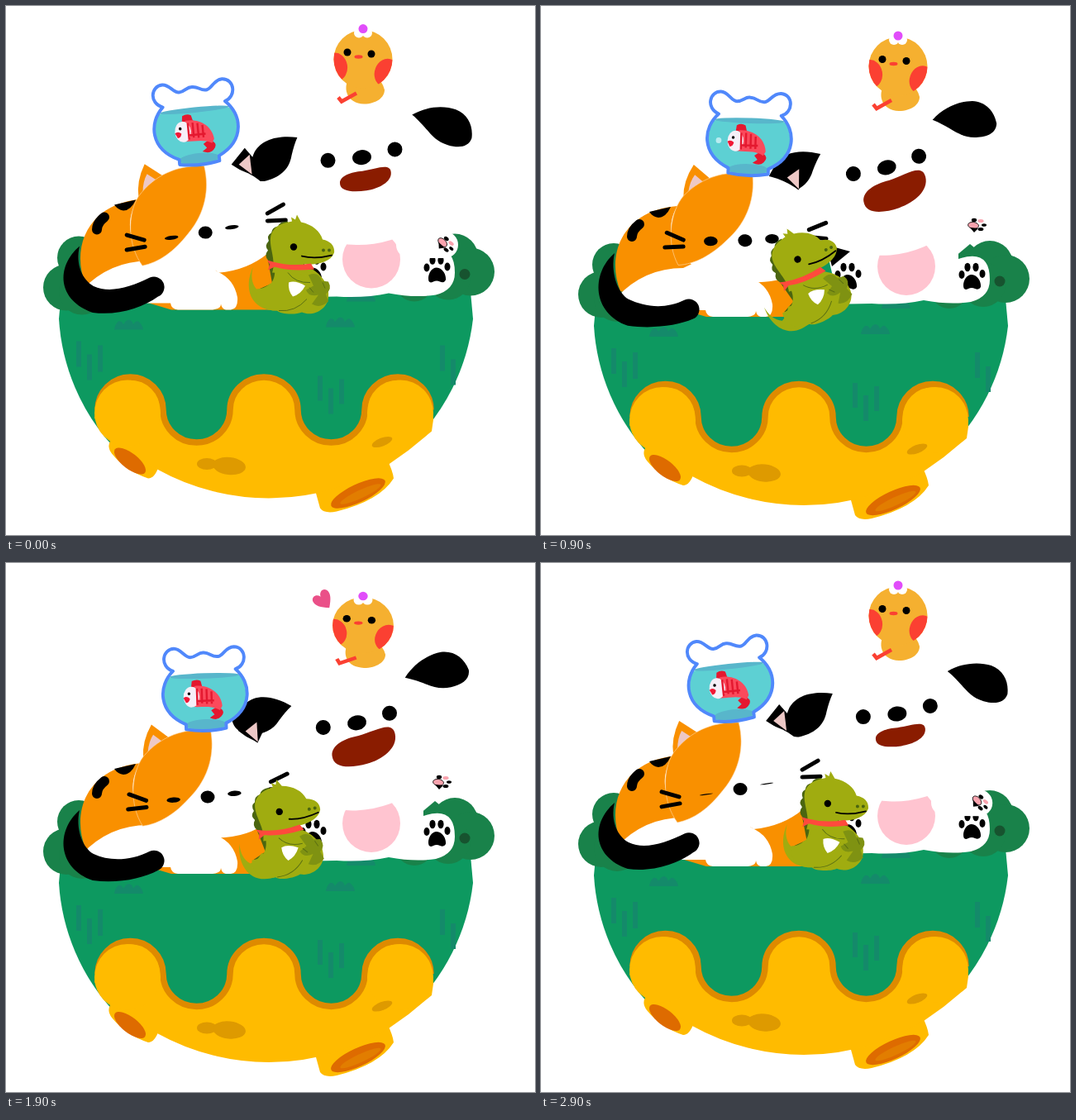
Animation of 640 by 640 pixels, one loop 3 s. Source, as an HTML page:

```html
<!DOCTYPE html>
<html lang="en">
<head>
<meta charset="utf-8">
<title>Animal friends</title>
<style>
html, body { margin: 0; width: 100%; height: 100%; overflow: hidden; background: #fff; }
svg { display: block; width: 100%; height: 100%; }
.bush { fill: #19824a; }
.grass { fill: #148a6a; }
.bars { stroke: #148a6a; stroke-width: 6; }
.line { fill: none; stroke: #000; stroke-width: 5; stroke-linecap: round; }
.white { fill: #fff; }
.orange { fill: #f99000; }
.ear { fill: #edc8c6; }
.red { fill: #fb4032; }
.spot { fill: #de9a00; }
.rind { fill: #ffbb00; }
.hole { fill: #de6b00; }
.croc { fill: #a0ac10; }
.moss { fill: #4b6510; }
</style>
</head>
<body>
<svg viewBox="0 0 640 640">
<defs>
  <clipPath id="chickFace"><circle cx="432" cy="64" r="35.5"/></clipPath>
  <g id="pads">
    <path d="M521 316C528 316 533 325 532 331Q530 335 525 333Q521 331 517 333Q511 336 511 329C511 323 515 316 521 316Z"/>
    <ellipse cx="509" cy="316" rx="3.5" ry="5"/><ellipse cx="516" cy="307" rx="3.6" ry="5.2"/>
    <ellipse cx="526" cy="307" rx="3.6" ry="5.2"/><ellipse cx="534" cy="315" rx="3.5" ry="5"/>
  </g>
  <path id="mound" class="grass" d="M-17 6Q-16-1-12-4Q-8-5-6 0Q-3-6 1-6Q5-5 6 0Q9-5 12-4Q17 0 18 6Z"/>
  <path id="glass" d="M-39-27C-56-34-51-54-37-54C-28-54-24-43-17-43C-9-43-7-49 0-48C8-48 10-42 18-43C25-44 27-54 38-54C54-53 54-31 39-27C58-10 60 22 25 38L25 44Q0 49-25 44L-25 38C-60 22-58-10-39-27Z"/>
</defs>
<g id="scene">
  <g id="bowl">
    <path fill="#0d9960" d="M64 378A251 251 0 0 0 130 533H487A251 251 0 0 0 565 378L562 345H67Z"/>
    <use href="#mound" x="148" y="385"/><use href="#mound" x="404" y="382"/><use href="#mound" x="429" y="351"/>
    <path class="bars" d="M88 405V436M101 421V452M114 410V442M528 410V441M541 427V458M380 447V477M393 462V493M406 451V481"/>
    <path class="rind" d="M133 520L126 526Q122 533 128 541Q145 562 172 571Q180 571 185 556ZM372 578L380 607Q385 614 400 611Q452 598 469 571Q468 562 461 548Z"/>
    <path class="rind" d="M109 488A40.5 39.5 0 0 1 190 488A40.5 39.5 0 0 0 271 488A41 39.5 0 0 1 353 488A40.5 39.5 0 0 0 434 488A41 39.5 0 0 1 516 488L517 500L515 514L487 537L463 554A278 278 0 0 1 183 560L131 525L107 498Z"/>
    <path fill="none" stroke="#de8a00" stroke-width="7.5" d="M111 488A39.5 39.5 0 0 1 190 488A40.5 39.5 0 0 0 271 488A41 39.5 0 0 1 353 488A40.5 39.5 0 0 0 434 488A40 39.5 0 0 1 514 488"/>
    <circle class="rind" cx="147" cy="492" r="40"/><circle class="rind" cx="477" cy="492" r="40"/>
    <ellipse class="hole" rx="23" ry="9.5" transform="translate(150 550) rotate(38)"/>
    <ellipse class="hole" rx="36" ry="11" transform="translate(426 589) rotate(-25)"/>
    <ellipse fill="#e27d00" rx="27" ry="5" transform="translate(429 590) rotate(-25)"/>
    <ellipse class="spot" cx="243" cy="553.5" rx="12" ry="7"/>
    <ellipse class="spot" rx="20" ry="10.5" transform="translate(270 556) rotate(6)"/>
    <ellipse class="spot" rx="13" ry="5" transform="translate(455 527) rotate(-21)"/>
  </g>
  <g class="bush">
    <circle cx="88" cy="304" r="26"/><circle cx="73" cy="340" r="28"/><circle cx="92" cy="345" r="28"/>
    <path d="M500 295L519 279L545 300V345H500Z"/>
    <circle cx="543" cy="303" r="28"/><circle cx="562" cy="321" r="29"/><circle cx="494" cy="334" r="23"/><circle cx="535" cy="328" r="27"/>
    <circle cx="555" cy="324" r="6.5" fill="#17532f"/>
  </g>

  <g id="dogBody">
    <path class="white" d="M345 290L505 270V297Q543 284 543 322Q543 343 520 349Q495 353 463 347Q435 353 400 351L345 352Z"/>
    <circle cx="442" cy="306" r="35" fill="#ffc4d0"/>
    <use href="#pads"/><use href="#pads" x="-150"/>
    <path id="arm" stroke="#fff" stroke-width="32" stroke-linecap="round"/>
    <g id="hand">
      <ellipse cx="-4" cy="0" rx="6.5" ry="4" fill="#f9a3ae" stroke="#000" stroke-width=".8" transform="rotate(8)"/>
      <path d="M-8 2L2 3L-3 8Z"/>
      <ellipse cx="-3" cy="-7" rx="3.2" ry="2.2"/><ellipse cx="5" cy="-6" rx="3.6" ry="2" fill="#f9a3ae"/>
      <ellipse cx="9" cy="-1" rx="3" ry="1.8"/><ellipse cx="5" cy="4" rx="3.4" ry="2"/>
    </g>
  </g>
  <g id="dogHead">
    <ellipse class="white" rx="108" ry="88" transform="translate(433 200) rotate(-8)"/>
    <path id="earL" d="M353 158C330 155 308 160 300 178C296 190 290 198 296 205C302 211 308 211 313 211C330 207 343 198 346 180Q349 167 353 158Z"/>
    <path id="earR" d="M492 131C510 121 530 120 545 125C560 131 566 145 564 160C560 171 548 172 535 168C515 162 512 148 492 131Z"/>
    <circle cx="390" cy="186" r="9"/><circle cx="471" cy="173" r="9"/>
    <ellipse rx="11.5" ry="9" transform="translate(431 182.5) rotate(-8)"/>
    <path id="mouth" fill="#8a1c00" d="M-30 2C-29-6-16-9-3-9C13-10 30-16 30-5C30 6 14 12 0 13C-15 14-31 12-30 2Z"/>
  </g>

  <path fill="#0d9960" d="M312 284H345L353 318H316Z"/>
  <path d="M345 280L374 288L352 306Z"/>

  <g id="catBody">
    <path class="orange" d="M96 336C78 290 100 238 165 233L200 290L255 300L316 290L322 315V367H200Z"/>
    <path class="white" d="M92 343Q125 308 172 308L210 290L256 321Q276 330 280 352Q281 366 272 367H266Q261 366 260 360Q260 366 250 367H208Q200 366 199 359H105Z"/>
    <path class="line" style="stroke-width:12" d="M110 270Q110 262 119 255"/>
    <path d="M131 240L157 234Q151 247 142 247Q135 246 131 240Z"/>
    <path id="tail"/>
  </g>
  <g id="catHead">
    <path class="orange" d="M160 232Q157 212 167 191L192 207Z"/>
    <path class="ear" d="M165 225Q165 212 170 203L184 212Z"/>
    <path d="M272 191L288 171L303 188L296 206Z"/>
    <path class="ear" d="M281 191L294 179L297 203Z"/>
    <ellipse class="white" rx="89" ry="64" transform="translate(238 257) rotate(-10)"/>
    <path class="white" d="M230 300L257 322Q292 319 317 298V245Z"/>
    <path class="orange" stroke="#ffd9a8" stroke-width=".6" d="M165 314C147 290 146 252 160 230C180 203 208 192 239 193C246 220 241 250 220 275C203 297 185 310 165 314Z"/>
    <ellipse class="catEye" rx="8.3" transform="translate(200 280) rotate(-8)"/>
    <ellipse class="catEye" rx="8.3" transform="translate(273 267) rotate(-8)"/>
    <ellipse cx="241" cy="273.5" rx="8.5" ry="7.5"/>
    <path class="line" d="M146 277L167 283M146 295L168 291M316 250L335 239M316 259L338 258"/>
    <g id="tank">
      <use href="#glass" fill="#fff"/>
      <path fill="#5dd0d3" d="M-45-19Q0-24 45-19C57 2 52 26 25 38L25 44Q0 49-25 44L-25 38C-52 26-57 2-45-19Z"/>
      <ellipse cy="-20" rx="44" ry="3.2" fill="#58b6cb"/><ellipse cy="39" rx="25" ry="6.5" fill="#58b6cb"/>
      <g transform="translate(-1 5)">
        <path fill="#e4182f" d="M-16-12L-15-19Q-9-22-4-19L-2-11ZM8 17Q16 11 20 15Q26 19 20 25Q15 30 6 26L12 22Z"/>
        <path fill="#fb4a5c" d="M-12-13C4-15 21-5 22 12L19 17C9 11 0 13-14 12Z"/>
        <ellipse cx="-16" cy="0" rx="10" ry="12.5" fill="#f6eff8"/>
        <path fill="none" stroke="#e4182f" stroke-width="2.5" d="M-9-10V10M-3-10V8M3-9V9M9-6V9M-9 5H12"/>
        <path fill="#f01836" d="M-26 1Q-22-2-18 2Q-19 7-23 7Z"/><circle cx="-19" cy="-4" r="1.8"/>
      </g>
      <circle id="bubble" cx="-38" cy="5" r="3.5" fill="#b9ecf0"/>
      <use href="#glass" fill="none" stroke="#5088fb" stroke-width="4" stroke-linejoin="round"/>
    </g>
  </g>

  <g id="croc">
    <path class="moss" d="M341 260Q331 260 329 266Q322 267 321 274Q315 277 318 284Q312 289 317 295Q312 301 317 307L322 335L306 342L330 345L345 290Z"/>
    <path id="crocTail" class="croc" d="M299 315C287 340 295 368 328 368L345 350L320 335Q312 342 303 342C297 335 296 325 299 315Z"/>
    <path class="croc" d="M304 342C300 358 312 369 328 368C332 373 352 373 358 370C372 376 389 366 390 352C392 338 382 325 371 318L325 316C327 330 319 344 304 342Z"/>
    <path class="croc" d="M322 322C328 305 315 287 322 273C328 263 337 262 346 260L345 255L350 258L352 252L357 261C371 264 380 272 383 282C393 284 398 290 397 298C393 309 378 313 360 312L365 325Z"/>
    <path fill="#7f9212" d="M366 325Q378 320 382 332L390 333Q395 342 387 348L390 357Q380 366 370 360L378 349Q366 352 363 343L372 338Z"/>
    <path class="white" d="M342 334Q350 331 362 338Q357 348 347 351Q341 344 342 334Z"/>
    <path fill="none" stroke="#5b7012" d="M341 322Q350 335 368 334M383 334L386 341M367 340L372 346M330 368Q350 370 364 354"/>
    <path fill="#ff4a3c" d="M316 307L323 309Q345 315 369 311L373 318Q343 321 325 315L317 319L319 312Z"/>
    <path class="line" style="stroke-width:1.8" d="M358 302Q374 306 394 301"/>
    <circle cx="348" cy="291" r="4.2"/><circle class="moss" cx="384" cy="295" r="2"/><circle class="moss" cx="391" cy="295" r="2"/>
  </g>

  <g id="chick">
    <path fill="#f5b030" d="M414 88C408 100 412 117 433 118C448 118 458 110 458 101Q457 96 453 90Z"/>
    <circle cx="432" cy="64" r="35.5" fill="#f5b030"/>
    <g class="red" clip-path="url(#chickFace)">
      <ellipse cx="399" cy="73" rx="14" ry="17" transform="rotate(-10 399 73)"/>
      <ellipse cx="460" cy="80" rx="14" ry="17" transform="rotate(20 460 80)"/>
    </g>
    <ellipse class="chickEye" cx="413" cy="55.5" rx="4.5"/><ellipse class="chickEye" cx="442" cy="57.5" rx="4.5"/>
    <ellipse class="red" cx="426.5" cy="61" rx="5" ry="2.2"/>
    <g class="white"><circle cx="427" cy="32" r="6"/><circle cx="437" cy="32" r="6"/><circle cx="425" cy="24" r="5"/><circle cx="439" cy="24" r="5"/><circle cx="432" cy="20" r="5"/></g>
    <circle cx="432" cy="27" r="5.5" fill="#e14dfa"/>
    <path id="leg" fill="none" stroke="#fb4032" stroke-width="4.5" d="M424 105L406 115L402 110"/>
  </g>
  <path id="heart" fill="#ea5088" d="M0 13C-9 5-14-1-12-8C-9-14-2-12 0-6C2-12 9-14 12-8C14-1 9 5 0 13Z"/>
</g>
</svg>
<script>
const LOOP = 3000, BEAT = 1500, STEP = 100;
const $ = id => document.getElementById(id);
const place = (id, transform) => $(id).setAttribute('transform', transform);
const all = (cls, name, value) =>
  document.querySelectorAll('.' + cls).forEach(el => el.setAttribute(name, value));
const ease = x => (1 - Math.cos(Math.PI * Math.min(1, Math.max(0, x)))) / 2;
const mix = (a, b, k) => a + (b - a) * k;

// Eased value through [time, value] pairs.
function track(t, keys) {
  const i = keys.findIndex(k => k[0] > t);
  const [t0, a] = keys[i - 1], [t1, b] = keys[i];
  return mix(a, b, ease((t - t0) / (t1 - t0)));
}

function draw(t) {
  const beat = t % BEAT;
  const bounce = 6 * (1 + Math.cos(2 * Math.PI * (t - 650) / BEAT));
  const u = (t + 80) % LOOP;
  const sway = u < 680 ? ease(u / 680) : 1 - (u - 680) / 2320;
  const soft = Math.sin(sway * Math.PI / 2);
  place('scene', `translate(0 ${bounce})`);

  // Dog
  place('dogHead', `rotate(${-6.8 * sway} 462 307)`);
  const flap = track(t, [[0, 0], [600, -14], [900, -13], [1300, -21], [1900, -26], [2300, -9], [2900, -1], [3000, 0]]);
  place('earR', `rotate(${flap} 492 131)`);
  place('earL', `rotate(${-flap} 353 158)`);
  const open = Math.min(1, sway * 4);
  place('mouth', `translate(${435 + 3 * open} ${208 + 4 * open}) rotate(${-4 - 4 * open}) scale(${1 + .33 * open} ${1 + .6 * open})`);
  const wave = Math.min(1, sway * 2.3);
  const handX = mix(530, 527, wave) + 5 * Math.sin(Math.PI * wave), handY = mix(291, 257, wave);
  $('arm').setAttribute('d', `M488 ${mix(290, 270, wave)}L${handX} ${handY}`);
  place('hand', `translate(${handX} ${handY}) rotate(${40 * (1 - wave)})`);

  // Cat
  place('catHead', `translate(0 ${-2.5 * sway}) rotate(${9 * sway} 219 318)`);
  const eye = t < 600 ? mix(2.4, 6.5, ease(t / 600)) : mix(6.5, .6, (t - 600) / 2300);
  all('catEye', 'ry', Math.max(.5, eye));
  place('tank', `translate(229 ${145 + 4 * soft}) rotate(-6) scale(.97 1)`);
  $('bubble').style.display = t >= 400 && t < 1100 ? '' : 'none';
  const drop = 20 * soft, sag = 8 * soft;
  $('tail').setAttribute('d', `M89 290C60 315 62 ${355 + sag} 105 ${370 + sag}C135 ${374 + sag} 165 ${364 + drop * .7} 184 ${350 + drop}
    A12 12 0 0 0 174 ${327 + drop}C150 ${339 + drop} 125 ${347 + sag} 106 ${338 + sag}C92 ${330 + sag} 84 312 89 290Z`);

  // Crocodile
  const lean = beat < 900 ? ease((beat - 180) / 470) : 1 - ease((beat - 920) / 540);
  place('croc', `rotate(${-25 * lean} 344 379)`);
  place('crocTail', `rotate(${-20 * lean} 325 355)`);

  // Chick
  const squash = beat > 250 && beat < 850 ? Math.sin(Math.PI * (beat - 250) / 600) ** 2 : 0;
  place('chick', `translate(432 118) scale(${1 + .08 * squash} ${1 - .09 * squash}) translate(-432 -118)`);
  place('leg', `rotate(${18 * squash} 424 105)`);
  all('chickEye', 'ry', squash > .8 ? 1.8 : 4.5);
  const rise = (beat - 400) / 200;
  $('heart').style.display = beat >= 300 && beat <= 700 ? '' : 'none';
  place('heart', `translate(${384 - 2.5 * rise} ${36 - 15 * rise}) rotate(-38) scale(${.9 + .1 * rise})`);
}

function frame(now) {
  draw(Math.floor(now % LOOP / STEP) * STEP);
  requestAnimationFrame(frame);
}
frame(performance.now());
</script>
</body>
</html>
```
